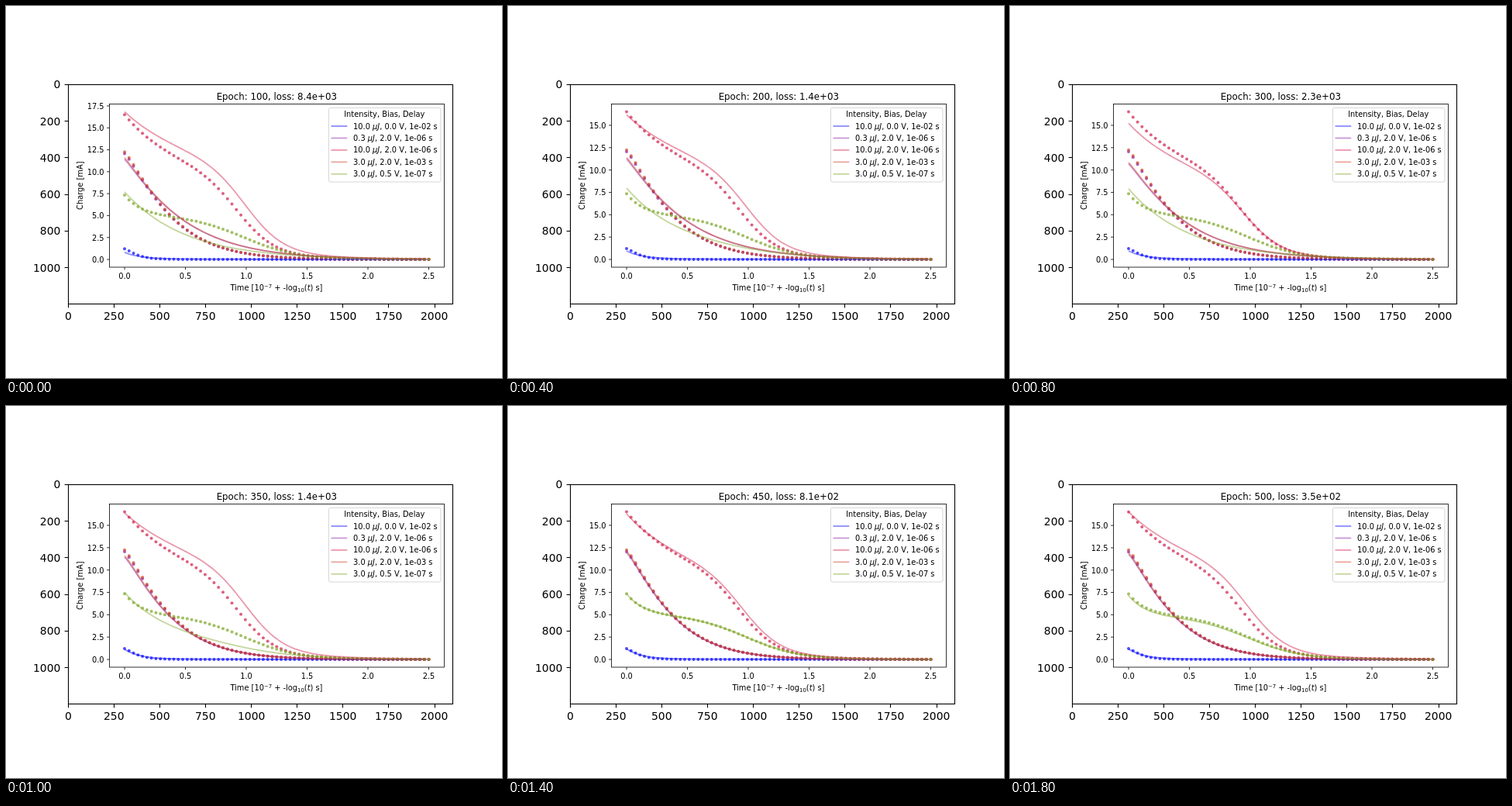
Recreate the animation shown at these times as an HTML page with a canvas. Size 640 px wide and 480 px high, loop 2 s.

```html
<!DOCTYPE html>
<html lang="en">
<head>
<meta charset="utf-8">
<title>Training fit</title>
<style>
html, body { margin: 0; width: 100%; height: 100%; overflow: hidden; background: #fff; }
canvas { display: block; }
</style>
</head>
<body>
<canvas id="stage" width="640" height="480"></canvas>
<script>
const ctx = document.getElementById('stage').getContext('2d');
const FONT = '"DejaVu Sans", sans-serif';
const BIG = 13.89, SMALL = 9.84;
const STEP = 200, STEPS = 10;
const BOX = { l: 133.5, t: 126.5, r: 565.5, b: 337 };
const LEFT = 153, PER_X = 157, ZERO = 327;
const PEAK = 16.53;                    // highest measured charge in mA

// Unit-height building blocks over u, the position on the time axis.
const decay = (a, p = 1) => u => Math.exp(-Math.pow(u / a, p));
const shelf = (c, w) => u => 1 / (1 + Math.exp((u - c) / w));
const mix = (f, g, k) => u => f(u) * (1 - k) + g(u) * k;
const times = (f, k) => u => f(u) * k;

// Measured and untrained shapes; training blends the second into the first.
const shapes = {
  blue: { data: decay(0.12, 1.25), rough: mix(decay(0.13), decay(1), 0.08) },
  crimson: {
    data: mix(decay(0.42), shelf(0.93, 0.155), 0.571),
    rough: mix(decay(0.6), shelf(1.03, 0.155), 0.635)
  },
  red: { data: decay(0.415, 1.2), rough: decay(0.51, 1.1) },
  green: { data: mix(decay(0.14), shelf(0.98, 0.22), 0.68), rough: decay(0.5) }
};

const series = [
  { rgb: '0,0,255', shape: 'blue', start: 1.22, label: ['10.0', '0.0', '1e-02'] },
  { rgb: '135,25,165', shape: 'red', start: 12.05, scale: 0.985, label: ['0.3', '2.0', '1e-06'] },
  { rgb: '208,28,72', shape: 'crimson', start: PEAK, label: ['10.0', '2.0', '1e-06'] },
  { rgb: '205,62,35', shape: 'red', start: 12.25, label: ['3.0', '2.0', '1e-03'] },
  { rgb: '124,164,36', shape: 'green', start: 7.4, label: ['3.0', '0.5', '1e-07'] }
];

// Each fit is [start in mA, how far it has learned the measured shape].
const poses = [
  { step: 0, loss: 8400, crimson: [16.85, 0.37], red: [11.6, 0], green: [7.7, 0], blue: [0.8, 0] },
  { step: 1, loss: 4100, crimson: [16.9, 0], red: [12.3, 0], green: [8.2, 0], blue: [0.95, 0] },
  { step: 2, loss: 1400, crimson: [16.2, 0.45], red: [11.4, 0], green: [8, 0.1], blue: [0.95, 0] },
  { step: 4, loss: 2300, crimson: [15.25, 0.85], red: [10.85, 0.15], green: [7.9, 0], blue: [0.95, 0] },
  { step: 5, loss: 1400, crimson: [16.4, 0.35], red: [11.6, 0.95], green: [7.5, 0.2], blue: [1.1, 0.3] },
  { step: 7, loss: 810, crimson: [16.3, 0.75], red: [12.1, 1], green: [7.4, 1], blue: [1.15, 0.3] },
  { step: 9, loss: 350, crimson: [16.55, 0.5], red: [11.95, 1], green: [7.2, 0.97], blue: [1.15, 0.3] }
];

function poseAt(step) {
  const next = poses.findIndex(p => p.step >= step);
  const b = poses[next], a = poses[next - 1] || b;
  const t = b === a ? 0 : (step - a.step) / (b.step - a.step);
  const blend = (p, q) => p + (q - p) * t;
  const pose = { loss: blend(a.loss, b.loss) };
  for (const name in shapes) pose[name] = a[name].map((v, i) => blend(v, b[name][i]));
  return pose;
}

function text(str, x, y, size, align = 'left', style = '') {
  ctx.font = `${style} ${size}px ${FONT}`;
  ctx.textAlign = align;
  ctx.fillText(str, x, y);
  return ctx.measureText(str).width;
}

// Runs are [string, size factor, rise, style].
function runs(parts, x, y) {
  for (const [str, k = 1, rise = 0, style = ''] of parts)
    x += text(str, x, y - rise * SMALL, SMALL * k, 'left', style);
}

function line(x1, y1, x2, y2) {
  ctx.beginPath();
  ctx.moveTo(x1, y1);
  ctx.lineTo(x2, y2);
  ctx.stroke();
}

function pen(width, color = '#000') {
  ctx.lineWidth = width;
  ctx.strokeStyle = color;
}

const snap = v => Math.round(v) + 0.5;

function drawOuterAxes() {
  const px = 496 / 2100;
  pen(1.1);
  ctx.fillStyle = '#000';
  ctx.strokeRect(80.5, 101.5, 496, 283);
  for (let v = 0; v <= 2000; v += 250) {
    const x = 80.12 + v * px;
    line(snap(x), 385, snap(x), 389.4);
    const width = ctx.measureText(v, ctx.font = `${BIG}px ${FONT}`).width;
    text(v, Math.round(x - width / 2), 405, BIG);
  }
  for (let v = 0; v <= 1000; v += 200) {
    const y = 100.81 + v * px;
    line(75.6, snap(y), 80, snap(y));
    text(v, 70.3, Math.round(y + 5.5), BIG, 'right');
  }
}

function drawInnerAxes(step, loss, perMilliamp) {
  pen(0.8);
  ctx.fillStyle = '#000';
  ctx.strokeRect(BOX.l, BOX.t, BOX.r - BOX.l, BOX.b - BOX.t);
  for (let v = 0; v <= 2.5; v += 0.5) {
    const x = LEFT + v * PER_X;
    line(x, BOX.b, x, BOX.b + 3.4);
    text(v.toFixed(1), x, 352, SMALL, 'center');
  }
  for (let v = 0; v <= 17.5; v += 2.5) {
    const y = ZERO - v * perMilliamp;
    if (y < BOX.t) break;
    line(BOX.l - 3.4, y, BOX.l, y);
    text(v.toFixed(1), 126.6, y + 3.9, SMALL, 'right');
  }
  const epoch = Math.min(500, 100 + step * 50);
  const lossText = loss.toExponential(1).replace('+', '+0');
  text(`Epoch: ${epoch}, loss: ${lossText}`, 349.3, 120.6, 11.81, 'center');
  runs([['Time ['], ['10'], ['−7', 0.7, 0.38], [' + -log'], ['10', 0.7, -0.2],
    ['('], ['t', 1, 0, 'italic'], [') s]']], 289.4, 367.4);
  ctx.save();
  ctx.translate(98.8, 231.7);
  ctx.rotate(-Math.PI / 2);
  text('Charge [mA]', 0, 0, SMALL, 'center');
  ctx.restore();
}

function drawLegend() {
  ctx.beginPath();
  ctx.roundRect(416.5, 131.4, 144.4, 95.6, 2);
  ctx.fillStyle = 'rgba(255,255,255,0.8)';
  ctx.fill();
  pen(1, 'rgba(204,204,204,0.8)');
  ctx.stroke();
  ctx.fillStyle = '#000';
  text('Intensity, Bias, Delay', 488.2, 143.3, SMALL, 'center');
  series.forEach(({ rgb, label: [energy, bias, delay] }, i) => {
    const y = 155 + i * 15.45;
    pen(1.8, `rgba(${rgb},0.45)`);
    line(419.5, y, 440.3, y);
    runs([[energy + ' '], ['μJ', 1, 0, 'italic'], [`, ${bias} V, ${delay} s`]], 448, y + 3.5);
  });
}

function drawDots(charge, rgb, perMilliamp) {
  ctx.fillStyle = `rgba(${rgb},0.7)`;
  for (let i = 0; i <= 68; i++) {
    const u = i * 2.5 / 68;
    ctx.beginPath();
    ctx.arc(LEFT + u * PER_X, ZERO - charge(u) * perMilliamp, 2, 0, 2 * Math.PI);
    ctx.fill();
  }
}

function drawFit(charge, rgb, perMilliamp) {
  pen(1.8, `rgba(${rgb},0.45)`);
  ctx.beginPath();
  for (let u = 0; u <= 2.5; u += 0.02) ctx.lineTo(LEFT + u * PER_X, ZERO - charge(u) * perMilliamp);
  ctx.stroke();
}

function draw(step) {
  const pose = poseAt(step);
  // The vertical axis fits the highest value with a small margin.
  const perMilliamp = 191.4 / (Math.max(PEAK, pose.crimson[0]) + 0.06);
  ctx.fillStyle = '#fff';
  ctx.fillRect(0, 0, 640, 480);
  drawOuterAxes();
  for (const { rgb, shape, start } of series)
    drawDots(times(shapes[shape].data, start), rgb, perMilliamp);
  for (const { rgb, shape, scale = 1 } of series) {
    const [start, learned] = pose[shape];
    const fit = mix(shapes[shape].rough, shapes[shape].data, learned);
    drawFit(times(fit, start * scale), rgb, perMilliamp);
  }
  drawInnerAxes(step, pose.loss, perMilliamp);
  drawLegend();
}

const begin = performance.now();
let shown = -1;
function tick() {
  const step = Math.floor((performance.now() - begin) / STEP) % STEPS;
  if (step !== shown) draw(shown = step);
  requestAnimationFrame(tick);
}
tick();
</script>
</body>
</html>
```
